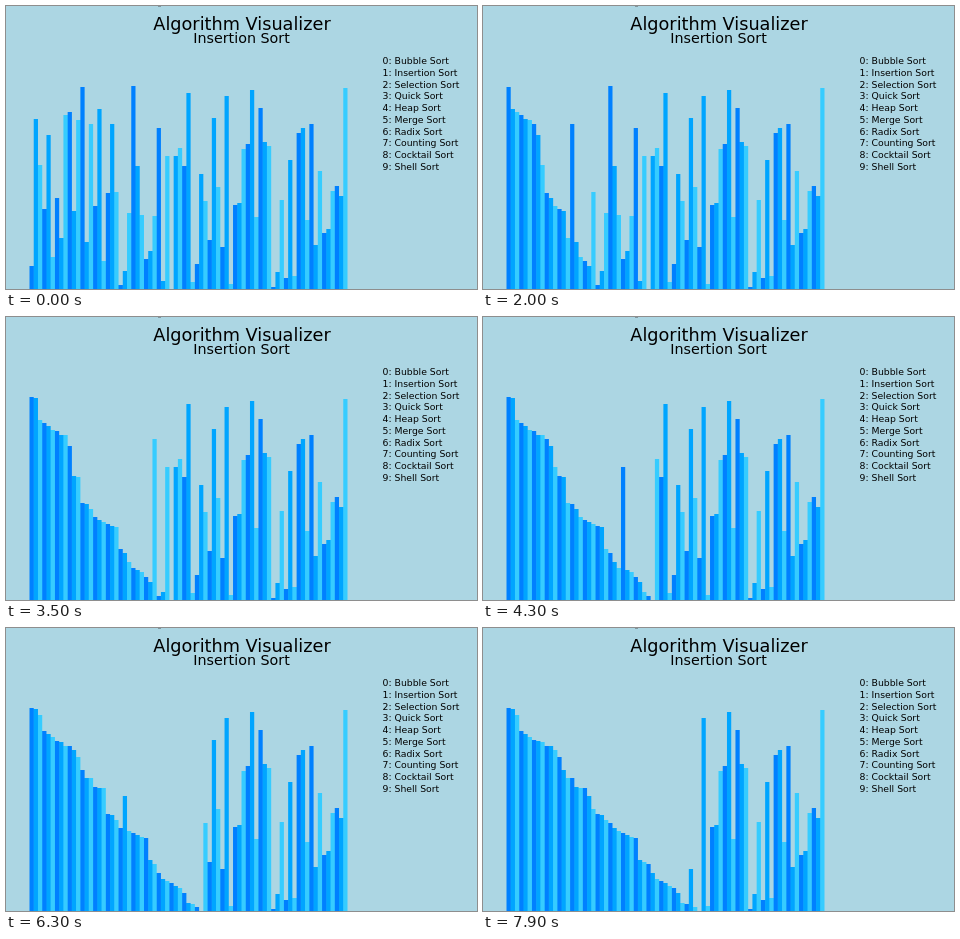
An HTML page with a canvas that plays this animation: 471 px wide and 283 px high, repeating every 8000 ms.

```html
<!DOCTYPE html>
<html lang="en">
<head>
<meta charset="utf-8">
<title>Algorithm Visualizer</title>
<style>
  html, body { margin: 0; width: 100%; height: 100%; overflow: hidden; background: #acd6e3; }
  canvas, svg { position: absolute; left: 0; top: 0; width: 471px; height: 283px; }
  text { font-family: "Comic Sans MS", "Comic Neue", "DejaVu Sans", sans-serif; fill: #000; }
  .mid { text-anchor: middle; }
</style>
</head>
<body>
<canvas id="stage" width="471" height="283"></canvas>
<svg viewBox="0 0 471 283">
  <rect x="152" y="0" width="3" height="1" fill="#7f969e"/>
  <text class="mid" x="236" y="23.5" font-size="17.7">Algorithm Visualizer</text>
  <text class="mid" x="235.5" y="37" font-size="14.3">Insertion Sort</text>
  <g id="menu" font-size="9.3"></g>
</svg>
<script>
const W = 471, H = 283, LOOP = 8000, TICK = 100;
const LEFT = 23.5, STEP = 4.24;
const COLORS = ['#0080ff', '#00a5ff', '#36ccff'];
const SORTS = ['Bubble', 'Insertion', 'Selection', 'Quick', 'Heap',
  'Merge', 'Radix', 'Counting', 'Cocktail', 'Shell'];

// Top edge of each bar before sorting
const TOPS = [
  260, 113, 159, 203, 129, 251, 192, 232, 109, 106, 205, 114, 81, 236, 118,
  200, 103, 255, 187, 118, 186, 279, 265, 207, 80, 160, 209, 253, 245, 210,
  122, 275, 150, 283, 150, 142, 160, 87, 276, 258, 168, 195, 234, 112, 181,
  241, 90, 278, 199, 197, 143, 138, 84, 211, 102, 136, 140, 281, 266, 194,
  272, 154, 270, 127, 122, 214, 118, 239, 165, 227, 223, 185, 180, 190, 82];

// Pace of the sort: [tick, swaps done]
const PACE = [[0, 0], [4, 0], [13, 55], [26, 134], [43, 238], [54, 303], [63, 358], [79, 456]];

const menu = document.getElementById('menu');
SORTS.forEach((name, i) => {
  const line = document.createElementNS('http://www.w3.org/2000/svg', 'text');
  line.setAttribute('x', 376.5);
  line.setAttribute('y', 58 + i * 11.78);
  line.textContent = `${i}: ${name} Sort`;
  menu.append(line);
});

function swapsAt(tick) {
  const k = Math.max(1, PACE.findIndex(p => p[0] >= tick));
  const [t0, s0] = PACE[k - 1], [t1, s1] = PACE[k];
  return Math.round(s0 + (s1 - s0) * (tick - t0) / (t1 - t0));
}

// Insertion sort, tallest bar first, stopped after a number of swaps
function sortFor(swaps) {
  const a = TOPS.slice();
  for (let i = 1; i < a.length; i++) {
    for (let j = i; j > 0 && a[j] < a[j - 1]; j--) {
      if (swaps-- <= 0) return a;
      [a[j - 1], a[j]] = [a[j], a[j - 1]];
    }
  }
  return a;
}

const ctx = document.getElementById('stage').getContext('2d');

function drawBars(tops) {
  ctx.clearRect(0, 0, W, H);
  tops.forEach((top, i) => {
    const x = LEFT + i * STEP;
    ctx.fillStyle = COLORS[i % 3];
    ctx.fillRect(x, top, STEP, H - top);
    // Close the seam shared with the next bar
    const seam = Math.max(top, tops[i + 1] ?? H);
    ctx.fillRect(x + STEP - 0.5, seam, 1, H - seam);
  });
}

const start = performance.now();
let shown = -1;

function frame() {
  const time = Math.max(0, performance.now() - start) % LOOP;
  const tick = Math.floor(time / TICK);
  if (tick !== shown) {
    shown = tick;
    drawBars(sortFor(swapsAt(tick)));
  }
  requestAnimationFrame(frame);
}
frame();
</script>
</body>
</html>
```
